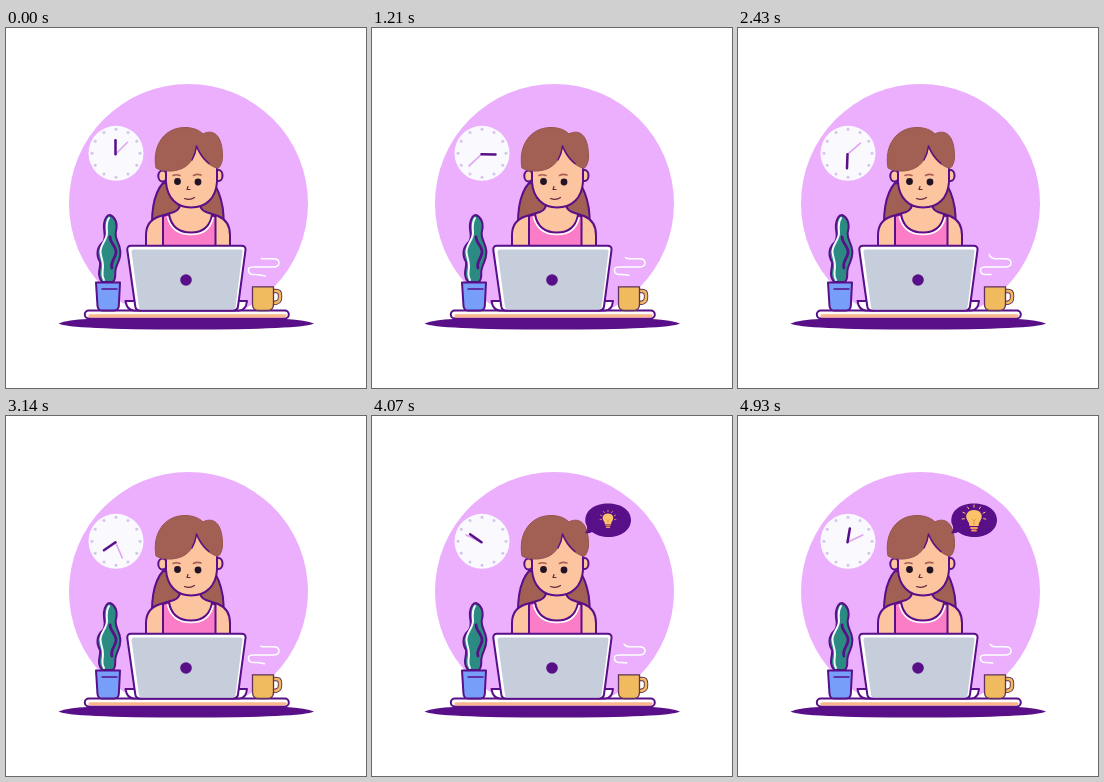
Animation of 360x360 px, one loop 5 s. Source, as an HTML page:

```html
<!DOCTYPE html>
<html lang="en">
<head>
<meta charset="utf-8">
<title>Working at a laptop</title>
<style>
  html, body { margin: 0; width: 100%; height: 100%; overflow: hidden; background: #fff; }
  svg { display: block; width: 100vw; height: 100vh; }
  .ink { stroke: #580f88; stroke-width: 2; stroke-linejoin: round; stroke-linecap: round; }
  .line { fill: none; stroke-linecap: round; stroke-linejoin: round; }
  .skin { fill: #fcc49f; }
  .hair { fill: #a26055; }
  .dark { fill: #580f88; }
</style>
</head>
<body>
<svg viewBox="0 0 360 360">
  <circle cx="182.5" cy="175.5" r="119.5" fill="#ebaffd"/>

  <g id="clock" transform="translate(110 125.3)">
    <circle r="27.5" fill="#faf9fe"/>
    <g transform="translate(-.5 1)">
      <path id="minute" class="line" d="M0 0V-17" stroke="#dfa5f2" stroke-width="1.6"/>
      <path id="hour" class="line" d="M0 0V-14" stroke="#580f88" stroke-width="2.5"/>
    </g>
  </g>

  <g id="woman">
    <path class="hair ink" d="M157 155C147 166 144 187 147 217H216C217 205 218 195 217.500 188C217 176 214 166 209 157Z"/>
    <path class="skin ink" d="M140 222V207Q140 193 153 188.500L168 184Q174 182 174 175H194Q194 182 200 184L212 188Q224 193 224 207V222Z"/>
    <path fill="#fc7dc7" class="ink" d="M157 222V188L163 186Q166 204.500 185 204.500Q203 204.500 206 187L209.500 188.500V222Z"/>
    <path class="line" d="M161.500 189Q166 206.500 185 206.500Q203 206.500 207 190" stroke="#fff" stroke-width="1.5"/>
    <ellipse class="skin ink" cx="156.500" cy="148" rx="4.200" ry="5.500"/>
    <ellipse class="skin ink" cx="212.500" cy="147.500" rx="4" ry="5.500"/>
    <path class="skin ink" d="M160 132V154C161 170 171 179.500 185 179.500C200 179.500 210 170 211 154V132L190 115Z"/>
    <path class="hair" d="M190.500 118C189 129 184 137 176 140.500C168 144 157 144 150 140C146 118 158 99.500 179 99.500C187 99.500 193 102 197 106C200 104 206 103 210 106.500C215 111 216.500 120 216.500 128C216.500 134 215 138 212 140.500C201 137 194 129 190.500 118Z" stroke="#96544e"/>
    <path class="line" d="M190.500 118Q189.500 126 186 132M190.500 118Q195 129 203 135.500" stroke="#580f88" stroke-width="1.4"/>
    <path class="line" d="M167 147.500Q170 146 174 147.500M187.500 147.500Q191 145.500 195 147" stroke="#a85e52" stroke-width="1.6"/>
    <circle cx="171.500" cy="153.500" r="3.400" fill="#211426"/>
    <circle cx="192" cy="154" r="3.400" fill="#211426"/>
    <path class="line" d="M182 158.500L181 161.500H184M178.500 170.500Q184 172.500 188.500 169.500" stroke="#65283f" stroke-width="1.2"/>
  </g>

  <path class="dark" d="M52.500 295.500Q62 291.500 82 291L180 290L280 291Q300 292 308 295.500Q296 301.500 180 301.500Q64 301.500 52.500 295.500Z"/>
  <rect class="ink" x="78.800" y="282.500" width="204" height="8" rx="4" fill="#fff"/>
  <path class="line" d="M84 287.800H279" stroke="#fdb58e" stroke-width="3.200"/>

  <g id="plant">
    <path class="ink" fill="#2b8a82" d="M96 254C90 246 95 240 94 234C89 226 92 218 97 214C101 209 97 203 98 196C99 190 101 187 104 187C109 189 112 195 110 203C108 210 113 214 114 221C116 230 111 235 110 240C108 246 111 250 107 254Z"/>
    <path class="line" d="M103 190C99.500 195 101 200 101 205C101 212 94 217 94.500 224C95 230 97 232 97 238C97 244 95 247 98 252" stroke="#f2f8fb" stroke-width="2"/>
    <path class="line" d="M104 209C104 215 111 219 110 225C109 231 104 234 106 240" stroke="#580f88" stroke-width="2.800"/>
    <path class="ink" fill="#779ffa" d="M90 254.500H114L112.800 278Q112.500 282.500 108 282.500H96Q92 282.500 91.500 278Z"/>
    <path class="line" d="M96 261H111" stroke="#580f88" stroke-width="1.4"/>
  </g>

  <g id="laptop">
    <path class="ink" fill="#fff" d="M119.500 273H241Q240 282.500 233 282.500H128Q121 282.500 119.500 273Z"/>
    <path class="ink" fill="#fff" d="M125 217.800H235.500Q240 217.800 239.500 222L232 278.500Q231.500 282.500 227 282.500H134Q130 282.500 129.300 278.500L121.300 222Q121 217.800 125 217.800Z"/>
    <path fill="#c6cedb" d="M128 221.500H234.500Q237 221.500 236.500 224L229.500 279Q229 281.500 226 281.500H136Q133.500 281.500 133 279L125.500 224Q125.500 221.500 128 221.500Z"/>
    <circle class="dark" cx="180" cy="252" r="5.800"/>
  </g>

  <g id="cup">
    <path class="line" d="M267 263H270Q274 263 274 267V270Q274 275 267 275" stroke="#60305f" stroke-width="4.400"/>
    <path class="line" d="M267 263H270Q274 263 274 267V270Q274 275 267 275" stroke="#f0ba5f" stroke-width="2.600"/>
    <path fill="#f0ba5f" stroke="#60305f" stroke-width="1.300" d="M246.500 258.800H267.500V276Q267.500 282.500 261.500 282.500H252.500Q246.500 282.500 246.500 276Z"/>
    <path id="steam" class="line" pathLength="100" d="M259 248Q253 246 247 246.500Q242 246 242.500 241Q243 239 248 239H267Q273 239 273 235Q273 230.800 267 230.800H258Q252 230.800 251 225.500" stroke="#fff" stroke-width="1.500"/>
  </g>

  <g id="bubble">
    <path class="dark" d="M213 117Q217 113 213.500 107C212 94 223 87.500 236 87.500C249 87.500 259 94 259 104C259 114 249 121 237 121C230 121 224 119 220 116Q217 118 213 117Z"/>
    <g id="bulb">
      <path fill="#fbc369" d="M231.500 110Q231.500 107 229.500 104.500C226 99 230 94 236 94C242 94 246 99 242.500 104.500Q240.500 107 240.500 110Z"/>
      <path class="line" d="M233 112H239M234 114.500H238" stroke="#f39b58" stroke-width="1.800"/>
      <path class="line" d="M234 103L236 105L238 103M236 105V109" stroke="#e88c4c" stroke-width=".8"/>
      <path id="rays" class="line" stroke="#fbc369" stroke-width="1"/>
    </g>
  </g>
</svg>
<script>
  const LOOP = 5000, FPS = 14;
  const $ = id => document.getElementById(id);
  const polar = (r, deg) => {
    const a = deg * Math.PI / 180;
    return [r * Math.sin(a), -r * Math.cos(a)];
  };
  const progress = (t, start, end) => Math.min(1, Math.max(0, (t - start) / (end - start)));
  const smooth = p => p * p * (3 - 2 * p);
  const scaleAt = (el, x, y, s) =>
    el.setAttribute('transform', `translate(${x} ${y}) scale(${s}) translate(${-x} ${-y})`);

  for (let deg = 0; deg < 360; deg += 30) {
    const dot = document.createElementNS('http://www.w3.org/2000/svg', 'circle');
    const [x, y] = polar(24, deg);
    dot.setAttribute('cx', x);
    dot.setAttribute('cy', y);
    dot.setAttribute('r', 1.5);
    dot.setAttribute('fill', '#d5c4ec');
    $('clock').prepend(dot);
  }
  $('clock').prepend($('clock').querySelector('circle[r="27.5"]'));

  $('rays').setAttribute('d', [-100, -67, -33, 0, 33, 67, 100].map(deg => {
    const [x1, y1] = polar(9.8, deg), [x2, y2] = polar(12, deg);
    return `M${236 + x1} ${101 + y1}L${236 + x2} ${101 + y2}`;
  }).join(''));

  $('steam').setAttribute('stroke-dasharray', '91 100');

  function draw(t) {
    $('hour').setAttribute('transform', `rotate(${t * 0.075})`);
    $('minute').setAttribute('transform', `rotate(${45 + t * 0.15})`);

    const drift = (1 - Math.cos(t * 2 * Math.PI / 1500)) / 2;
    $('steam').setAttribute('stroke-dashoffset', -9 * drift);

    scaleAt($('bubble'), 210.5, 116, smooth(progress(t, 3510, 3980)));
    scaleAt($('bulb'), 236, 105, smooth(progress(t, 3860, 4200)));
  }

  function tick(now) {
    const step = Math.floor((now % LOOP + 5) * FPS / 1000) % (LOOP * FPS / 1000);
    draw(step * 1000 / FPS);
    requestAnimationFrame(tick);
  }
  requestAnimationFrame(tick);
</script>
</body>
</html>
```
